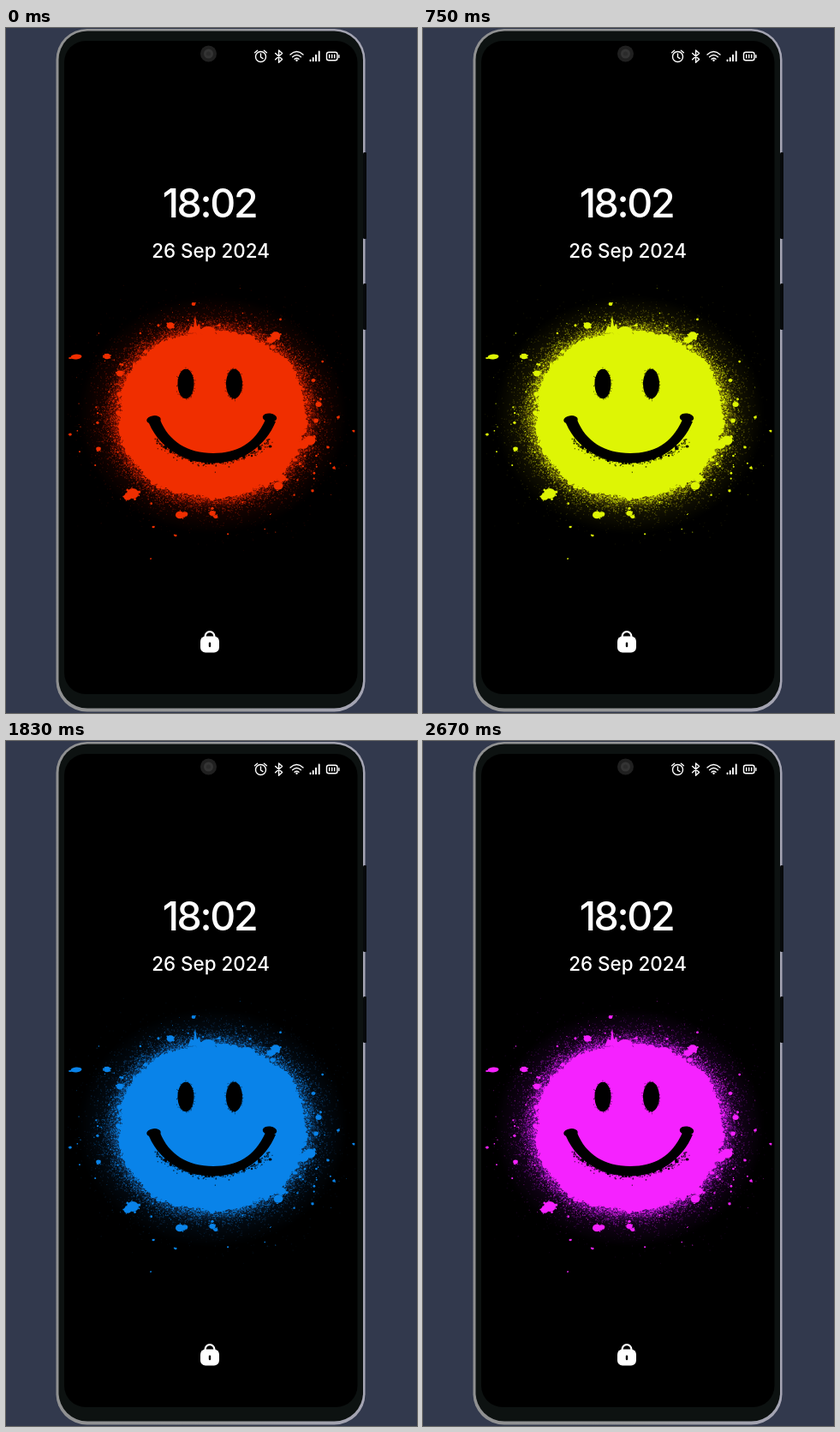
Animation of 480 by 799 pixels, one loop 2700 ms. Source, as an HTML page with a canvas:

```html
<!DOCTYPE html>
<html lang="en">
<head>
<meta charset="utf-8">
<title>Lock screen</title>
<style>
  html, body { margin: 0; width: 100%; height: 100%; overflow: hidden; background: #32394d; }
  svg, canvas { position: absolute; left: 0; top: 0; width: 480px; height: 799px; }
  text { font-family: Inter, "Open Sans", sans-serif; font-weight: 500; fill: #fff; text-anchor: middle; }
  .time { font-size: 46.5px; letter-spacing: -.05em; }
  .date { font-size: 22.4px; }
  .icon { fill: none; stroke: #fff; stroke-width: 1.4; stroke-linecap: round; stroke-linejoin: round; }
</style>
</head>
<body>
<svg viewBox="0 0 480 799">
  <defs>
    <linearGradient id="rim">
      <stop offset="0" stop-color="#8f9091"/>
      <stop offset=".5" stop-color="#979899"/>
      <stop offset="1" stop-color="#a5a5b4"/>
    </linearGradient>
  </defs>
  <rect x="416" y="145" width="5" height="101" rx="1.5" fill="#07090b"/>
  <rect x="416" y="298" width="5" height="54" rx="1.5" fill="#07090b"/>
  <rect x="58.500" y="1" width="361" height="796.500" rx="36" fill="url(#rim)"/>
  <rect x="61.500" y="3.500" width="355.500" height="790" rx="33.500" fill="#0d1211"/>
  <rect x="417" y="145" width="4" height="101" rx="1.5" fill="#07090b"/>
  <rect x="417" y="298" width="4" height="54" rx="1.5" fill="#07090b"/>
  <rect x="68" y="15" width="342.500" height="762" rx="25"/>

  <circle cx="236.5" cy="30" r="9.5" fill="#202020"/>
  <circle cx="236.5" cy="30" r="5.5" fill="#343434"/>
  <circle cx="236.5" cy="30" r="2.6" fill="#2b2b2b"/>

  <g class="icon">
    <circle cx="297.5" cy="33.5" r="6"/>
    <path d="M297.5 30v4l2.5 1.6M290.6 28.8l3-2.6M304.4 28.8l-3-2.6"/>
    <path d="M314.6 29.4l8 7.2-4 3.6V26l4 3.6-8 7.2"/>
    <path d="M332 31q7.5-7 15 0M334.6 33.8q4.9-4.6 9.8 0M337 36.3q2.5-2.3 5 0"/>
    <path d="M355.5 37.5v.8M358.7 35v3.3M362 31.8v6.5M365.7 27.5v10.8" stroke-width="1.9"/>
    <rect x="374.5" y="28.3" width="12.5" height="9.5" rx="2.5"/>
    <path d="M388.9 31.7v2.8M377.7 31.3v3.5M380.7 31.3v3.5M383.7 31.3v3.5"/>
  </g>
  <circle cx="339.5" cy="37.8" r="1.2" fill="#fff"/>

  <text class="time" x="237.5" y="221">18:02</text>
  <text class="date" x="239" y="267.5">26 Sep 2024</text>

  <path d="M232.6 712v-2.5a5.4 5.4 0 0 1 10.8 0V712" fill="none" stroke="#fff" stroke-width="2.2"/>
  <rect x="227" y="709.5" width="22" height="19" rx="6" fill="#fff"/>
  <path d="M238 717.8v3.2" stroke="#000" stroke-width="2.4" stroke-linecap="round"/>
</svg>
<canvas id="art" width="480" height="799"></canvas>

<script>
const W = 480, H = 799, LOOP = 2700, STEP = 30, TAU = Math.PI * 2;
const CX = 241, CY = 451, RX = 111, RY = 98;

// time, paint colour, overspray colour
const HUES = [
  [0, '#f02e00', '#a31400'],
  [330, '#ff990a', '#a84436'],
  [560, '#fad806', '#a56c1c'],
  [750, '#def505', '#948a08'],
  [1110, '#46df00', '#367f12'],
  [1530, '#12e0d2', '#24806c'],
  [2130, '#0026ff', '#0018a4'],
  [2670, '#f522ff', '#8a10b4']
];

// x, y, radius
const DROPS = [
  192,347,4.3, 219,322,2.4, 315,359,5.5, 309,364,4.5, 282,363,7,
  118,383,3.8, 133,403,4, 148,543,7, 142,547,4.3, 203,568,5,
  209,567,3.3, 241,566,3.6, 245,570,2.5, 355,481,6.5, 347,486,6,
  318,534,5.5, 322,525,5, 359,411,2.4, 365,439,3.6, 362,458,2.8,
  388,454,1.9, 383,513,1.8, 376,489,1.8, 358,540,1.7, 406,470,1.5,
  108,491,2.8, 75,474,1.8, 172,582,1.5, 198,592,1.6, 169,619,1
];

let seed = 26;
function rnd() {
  seed = (seed + 0x6D2B79F5) | 0;
  let n = Math.imul(seed ^ (seed >>> 15), 1 | seed);
  n = (n + Math.imul(n ^ (n >>> 7), 61 | n)) ^ n;
  return ((n ^ (n >>> 14)) >>> 0) / 4294967296;
}
const spread = k => -Math.log(1 - rnd()) * k;

function layer() {
  const c = document.createElement('canvas');
  c.width = W;
  c.height = H;
  return c.getContext('2d');
}

function oval(g, x, y, rx, ry = rx, turn = 0) {
  g.beginPath();
  g.ellipse(x, y, rx, ry, turn, 0, TAU);
  g.fill();
}

// Point at angle a, d times the blob radius from its centre
function polar(a, d) {
  const c = Math.cos(a), s = Math.sin(a);
  const k = d / Math.pow(Math.abs(c) ** 2.2 + Math.abs(s) ** 2.2, 1 / 2.2);
  return [CX + RX * k * c, CY + RY * k * s];
}

const inArt = (x, y) => x > 72 && x < 408 && y > 297 && y < 619;

function speck(g, x, y, size, alpha) {
  g.globalAlpha = alpha;
  g.fillRect(x - size / 2, y - size / 2, size, size);
  g.globalAlpha = 1;
}

function makePaint() {
  const g = layer();
  g.beginPath();
  for (let i = 0; i < 360; i++) {
    const a = i / 360 * TAU;
    const wave = .012 * Math.sin(a * 9 + 1) + .008 * Math.sin(a * 17);
    g.lineTo(...polar(a, .96 + wave + rnd() * .035));
  }
  g.fill();

  for (let i = 0; i < 4200; i++) {
    const d = .95 + spread(.065);
    const [x, y] = polar(rnd() * TAU, d);
    speck(g, x, y, .7 + rnd() * .7, Math.max(.2, 1 - (d - .95) * 2.8));
  }
  // Ragged clumps on the rim
  for (let i = 0; i < 90; i++) {
    const [x, y] = polar(rnd() * TAU, .95 + rnd() * .05);
    oval(g, x, y, 1 + rnd() * 2.5, 1 + rnd() * 2);
  }
  // Loose droplets
  for (let i = 0; i < 170; i++) {
    const [x, y] = polar(rnd() * TAU, 1.05 + spread(.16));
    if (inArt(x, y)) oval(g, x, y, .4 + rnd() ** 4 * 1.3);
  }
  for (let i = 0; i < DROPS.length; i += 3) {
    const [x, y, r] = DROPS.slice(i, i + 3);
    oval(g, x, y, r, r * .85);
    for (let j = 0; j < r; j++) {
      const a = rnd() * TAU;
      oval(g, x + Math.cos(a) * r * 1.1, y + Math.sin(a) * r, .3 + rnd() * r * .2);
    }
  }
  oval(g, 82, 383.5, 6.5, 3, -.1);
  oval(g, 75, 385, 2, 1);
  oval(g, 236, 354, 9, 6);
  g.fill(new Path2D('M212 356l4-9 3 2 2-14 2 13 3-3 1 6 6 4z'));
  return g.canvas;
}

function makeSpray() {
  const g = layer();
  g.save();
  g.translate(CX, CY);
  g.scale(RX, RY);
  const glow = g.createRadialGradient(0, 0, .9, 0, 0, 1.42);
  glow.addColorStop(0, 'rgba(0,0,0,.85)');
  glow.addColorStop(.2, 'rgba(0,0,0,.5)');
  glow.addColorStop(.45, 'rgba(0,0,0,.14)');
  glow.addColorStop(1, 'rgba(0,0,0,0)');
  g.fillStyle = glow;
  g.fillRect(-1.5, -1.5, 3, 3);
  g.restore();
  for (let i = 0; i < 4800; i++) {
    const d = .98 + spread(.13);
    const [x, y] = polar(rnd() * TAU, d);
    if (inArt(x, y)) speck(g, x, y, .7 + rnd() * .6, Math.max(.15, .85 - (d - .98) * 1.8));
  }
  return g.canvas;
}

function makeFace() {
  const g = layer();
  for (const x of [210, 266.5]) {
    oval(g, x, 415, 9.5, 17.3);
    for (let i = 0; i < 40; i++) {
      const a = rnd() * TAU, d = 1 + spread(.05);
      speck(g, x + Math.cos(a) * 9.5 * d, 415 + Math.sin(a) * 17.3 * d, 1, .6);
    }
  }
  g.fill(new Path2D(`M167 461C182 495 214 507.5 242 507.5C276 507.5 303 488 315 459
    L303 457C290 485 270 496 242 496C212 496 190 482 180 457Z`));
  oval(g, 172.5, 457, 8.3, 4.8, -.12);
  oval(g, 308, 454.5, 8.3, 5, .12);

  // Overspray below the smile
  for (let i = 0; i < 220; i++) {
    const a = .5 + rnd() * (Math.PI - 1), d = 1 + spread(.028);
    speck(g, 241 + Math.cos(a) * 74 * d, 453 + Math.sin(a) * 53.5 * d, .7 + rnd(), .7);
  }
  for (let i = 0; i < 12; i++) {
    const a = .7 + rnd() * 1.8;
    oval(g, 241 + Math.cos(a) * 74, 453 + Math.sin(a) * 53.5, 1.5, 1 + rnd() * 2);
  }
  oval(g, 308.5, 488, 2, 1.6);
  oval(g, 297, 491, 1.6, 1.2);
  oval(g, 287, 499, 1.2);
  return g.canvas;
}

const channels = hex => [1, 3, 5].map(i => parseInt(hex.slice(i, i + 2), 16));

function colourAt(t, column) {
  let i = 0;
  while (i < HUES.length - 2 && t >= HUES[i + 1][0]) i++;
  const from = HUES[i], to = HUES[i + 1];
  const k = Math.min(1, (t - from[0]) / (to[0] - from[0]));
  const end = channels(to[column]);
  return `rgb(${channels(from[column]).map((v, n) => Math.round(v + (end[n] - v) * k))})`;
}

const paint = makePaint(), spray = makeSpray(), face = makeFace();
const view = document.getElementById('art').getContext('2d');
const scratch = layer();

function drawTinted(mask, colour) {
  scratch.globalCompositeOperation = 'copy';
  scratch.drawImage(mask, 0, 0);
  scratch.globalCompositeOperation = 'source-in';
  scratch.fillStyle = colour;
  scratch.fillRect(0, 0, W, H);
  view.drawImage(scratch.canvas, 0, 0);
}

let shown = -1;
const start = performance.now();
function tick(now) {
  const t = Math.floor(Math.max(0, now - start) % LOOP / STEP) * STEP;
  if (t !== shown) {
    shown = t;
    view.clearRect(0, 0, W, H);
    drawTinted(spray, colourAt(t, 2));
    drawTinted(paint, colourAt(t, 1));
    view.drawImage(face, 0, 0);
  }
  requestAnimationFrame(tick);
}
tick(start);
</script>
</body>
</html>
```
